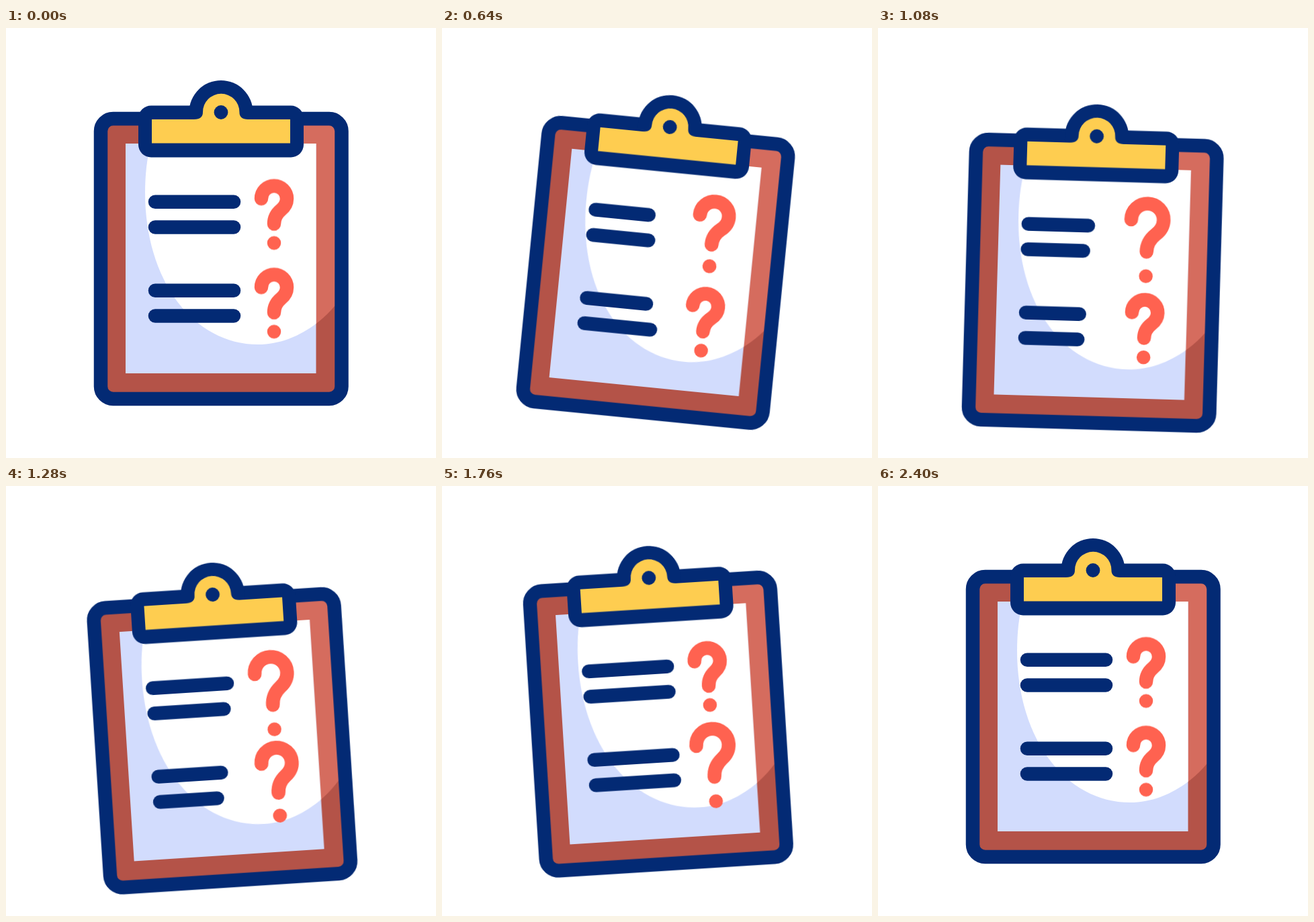
Recreate the animation shown at these times as an HTML page. Size 640 px wide and 640 px high, loop 2.44 s.

```html
<!DOCTYPE html>
<html lang="en">
<head>
<meta charset="utf-8">
<title>Clipboard</title>
<style>
  html, body { margin: 0; width: 100%; height: 100%; overflow: hidden; background: #fff; }
  svg { display: block; width: 100%; height: 100%; }

  .bob, .tilt, .ask, .lines path { animation: 2440ms linear infinite; }
  .bob { animation-name: bob; }
  .tilt { animation-name: tilt; transform-origin: 320px 320px; }

  .lines path {
    fill: none; stroke: #032a74; stroke-width: 20.5; stroke-linecap: round;
    stroke-dasharray: 117 300;
    animation-name: shrink;
    animation-delay: calc(var(--i) * 80ms);
  }
  .ask {
    fill: none; stroke: #ff6250; stroke-width: 20.5;
    stroke-linecap: round; stroke-linejoin: round;
    transform-origin: 0 0;
  }
  .first { animation-name: grow-first; }
  .second { animation-name: grow-second; }

  @keyframes bob {
    0% { transform: translateY(0); animation-timing-function: cubic-bezier(.6, 0, .4, 1); }
    49.18% { transform: translateY(36px); animation-timing-function: cubic-bezier(.6, 0, .4, 1); }
    88.52%, 100% { transform: translateY(0); }
  }
  @keyframes tilt {
    0% { transform: rotate(0deg); animation-timing-function: cubic-bezier(.6, 0, .4, 1); }
    28.69% { transform: rotate(5.7deg); animation-timing-function: cubic-bezier(.6, 0, .5, 1); }
    61.48% { transform: rotate(-5.25deg); animation-timing-function: cubic-bezier(.45, 0, .55, 1); }
    88.52%, 100% { transform: rotate(0deg); }
  }
  @keyframes shrink {
    0%, 1.64% { stroke-dashoffset: 0; animation-timing-function: cubic-bezier(.6, 0, .4, 1); }
    31.97% { stroke-dashoffset: 39; animation-timing-function: cubic-bezier(.6, 0, .4, 1); }
    62.3%, 100% { stroke-dashoffset: 0; }
  }
  /* The stroke thins as the mark grows, so its drawn weight stays the same. */
  @keyframes grow-first {
    0%, 16.8% { transform: scale(1); stroke-width: 20.5; animation-timing-function: cubic-bezier(.6, 0, .4, 1); }
    35.66%, 52.46% { transform: scale(1.27); stroke-width: 16.14; animation-timing-function: cubic-bezier(.6, 0, .4, 1); }
    71.31%, 100% { transform: scale(1); stroke-width: 20.5; }
  }
  @keyframes grow-second {
    0%, 41.39% { transform: scale(1); stroke-width: 20.5; animation-timing-function: cubic-bezier(.6, 0, .4, 1); }
    60.25%, 73.77% { transform: scale(1.27); stroke-width: 16.14; animation-timing-function: cubic-bezier(.6, 0, .4, 1); }
    92.62%, 100% { transform: scale(1); stroke-width: 20.5; }
  }
</style>
</head>
<body>
<svg viewBox="0 0 640 640">
  <defs>
    <path id="shine" d="M224 145C212 175 207 210 207 245C207 376 279 471 375 471C420 471 462 446 489 414L499 402V140H226Z"/>
    <clipPath id="sheet"><rect x="178" y="172" width="283.5" height="342"/></clipPath>
    <path id="mark" d="M-19-23.5a19 19 0 0 1 38 0c0 8-4 13-9 17c-6 5-10 11-10 20.5M0 42.5h.01"/>
  </defs>
  <g class="bob">
    <g class="tilt">
      <rect x="141" y="135" width="358" height="417" rx="18" fill="#b45348"/>
      <use href="#shine" fill="#d56c5e"/>
      <rect x="178" y="172" width="283.5" height="342" fill="#d2dcfd"/>
      <g clip-path="url(#sheet)"><use href="#shine" fill="#fff"/></g>
      <rect x="141" y="135" width="358.5" height="417" rx="18.5" fill="none" stroke="#032a74" stroke-width="20.5"/>

      <g fill="#032a74">
        <rect x="197" y="115.5" width="246" height="77" rx="19"/>
        <circle cx="320" cy="125.5" r="47.5"/>
      </g>
      <path fill="#fecd50" d="M217 136H280Q293 136 293 125A27.2 27.2 0 0 1 347.4 125Q347.4 136 360 136H423V171.5H217Z"/>
      <circle cx="320" cy="125.5" r="10.4" fill="#032a74"/>

      <g class="lines">
        <path style="--i:0" d="M222 258.7h117"/>
        <path style="--i:1" d="M222 296.4h117"/>
        <path style="--i:2" d="M222 390.8h117"/>
        <path style="--i:3" d="M222 428.5h117"/>
      </g>
      <g transform="translate(399 277.5)"><use class="ask first" href="#mark"/></g>
      <g transform="translate(399 409.5)"><use class="ask second" href="#mark"/></g>
    </g>
  </g>
</svg>
</body>
</html>
```
